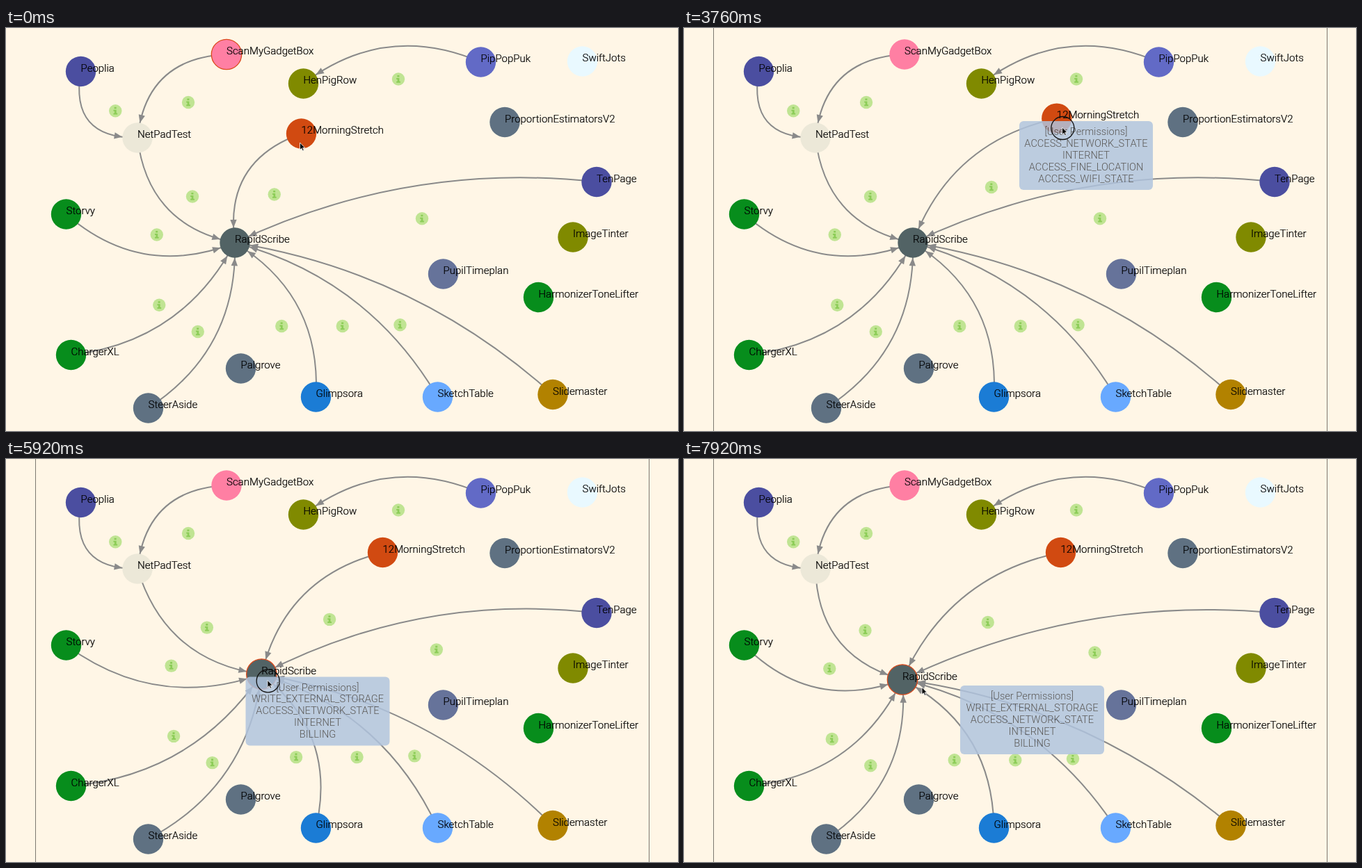
Recreate the animation shown at these times as an HTML page. Size 966 by 580 pixels, loop 8 s.

```html
<!DOCTYPE html>
<html lang="en">
<head>
<meta charset="utf-8">
<style>
  html, body { margin: 0; width: 100%; height: 100%; overflow: hidden; background: #fff6e6; }
  svg { display: block; width: 966px; height: 580px; font: 300 15px Roboto, "Liberation Sans", sans-serif; }
  text { stroke: #000; stroke-width: .2; }
  .edge { fill: none; stroke: #8a8a8a; stroke-width: 2; }
  .tip { font-size: 14.6px; text-anchor: middle; fill: #3c3c3c; stroke: none; }
</style>
</head>
<body>
<svg id="stage" viewBox="0 0 966 580"></svg>
<script>
const LOOP = 8000, RADIUS = 21.7, BEND = 75;
const NODE_LAG = 110, BADGE_LAG = 50;
const GREEN = '#078d1c', SLATE = '#5f7182', INDIGO = '#4b4ea0', OLIVE = '#808a00';

const nodes = {
  people: ['Peoplia', 107.5, 62.5, INDIGO],
  scan: ['ScanMyGadgetBox', 317, 38, '#ff7fa3'],
  web: ['NetPadTest', 189, 158, '#ece8d8'],
  farm: ['HenPigRow', 427.5, 80, OLIVE],
  stretch: ['12MorningStretch', 424.5, 152, '#d14a11'],
  pip: ['PipPopPuk', 682.5, 49, '#626ac6'],
  jots: ['SwiftJots', 828.5, 48, '#e9f9ff'],
  ratio: ['ProportionEstimatorsV2', 717, 135.5, SLATE],
  page: ['TenPage', 849, 221.5, INDIGO],
  story: ['Storvy', 86.5, 268, GREEN],
  hub: ['RapidScribe', 329, 309, '#526365'],
  tint: ['ImageTinter', 815, 301, OLIVE],
  pupil: ['PupilTimeplan', 628.5, 354, '#66739a'],
  tone: ['HarmonizerToneLifter', 765.5, 387.5, GREEN],
  charge: ['ChargerXL', 93.5, 470.5, GREEN],
  grove: ['Palgrove', 337.5, 490, SLATE],
  steer: ['SteerAside', 204.5, 547, SLATE],
  glimpse: ['Glimpsora', 445.5, 531, '#1b7cd5'],
  sketch: ['SketchTable', 620.5, 531, '#68a9ff'],
  slide: ['Slidemaster', 786, 527.5, '#b28200'],
};

const edges = [
  ['people', 'web'], ['scan', 'web'], ['pip', 'farm'],
  ...['web', 'stretch', 'page', 'story', 'charge', 'steer', 'glimpse', 'sketch', 'slide'].map(id => [id, 'hub']),
];

// Pointer stops as [ms, x, y]; dragged nodes and tooltips follow from them.
const stops = [
  [300, 422.5, 165], [1000, 430.5, 163.5], [2560, 430.5, 163.5], [2880, 429, 195],
  [3280, 472, 125], [3600, 541, 141], [4000, 547.5, 146], [4500, 547.5, 146],
  [4900, 334.5, 304.5], [5000, 331.5, 318.5], [5120, 331.5, 324], [6120, 387, 317],
  [6420, 373, 355], [6500, 353, 373], [6560, 339.5, 365.5], [7640, 316.5, 327], [7920, 342, 328.5],
];
const drags = { stretch: [2400, 4240], hub: [5000, 7640] };

const exerciseRights = ['ACCESS_NETWORK_STATE', 'INTERNET', 'ACCESS_FINE_LOCATION', 'ACCESS_WIFI_STATE'];
const editorRights = ['WRITE_EXTERNAL_STORAGE', 'ACCESS_NETWORK_STATE', 'INTERNET', 'BILLING'];
const tips = [
  { from: 1040, to: 3280, width: 192, rights: exerciseRights },
  { from: 3280, to: 4480, width: 192, rights: exerciseRights },
  { from: 4900, to: 6120, width: 207, rights: editorRights },
  { from: 6120, to: LOOP, width: 207, rights: editorRights },
];

const within = (t, from, to) => t >= from && t < to;
const clamp = (v, lo, hi) => Math.min(hi, Math.max(lo, v));
const mix = (a, b, p) => a + (b - a) * p;

function pointerAt(t) {
  const next = stops.findIndex(stop => stop[0] > t);
  if (next <= 0) return stops.at(next).slice(1);
  const [t0, x0, y0] = stops[next - 1], [t1, x1, y1] = stops[next];
  const p = (t - t0) / (t1 - t0);
  return [mix(x0, x1, p), mix(y0, y1, p)];
}

function place(id, t, lag = NODE_LAG) {
  const [, x, y] = nodes[id];
  if (!drags[id]) return [x, y];
  const [from, to] = drags[id];
  const grab = pointerAt(from), now = pointerAt(clamp(t - lag, from, to));
  return [x + now[0] - grab[0], y + now[1] - grab[1]];
}

// Curves join node centres; the discs drawn later cover their ends.
function drawEdge([from, to], t) {
  const a = place(from, t), b = place(to, t);
  const dx = b[0] - a[0], dy = b[1] - a[1], k = BEND / Math.hypot(dx, dy);
  const control = [(a[0] + b[0]) / 2 - dy * k, (a[1] + b[1]) / 2 + dx * k];
  const curve = u => [0, 1].map(i => mix(mix(a[i], control[i], u), mix(control[i], b[i], u), u));
  const before = gap => {
    let u = 1, p = b;
    while (u > 0 && Math.hypot(p[0] - b[0], p[1] - b[1]) < gap) p = curve(u -= 0.001);
    return p;
  };
  const tip = before(RADIUS), tail = before(RADIUS + 11);
  const angle = Math.atan2(tip[1] - tail[1], tip[0] - tail[0]) * 180 / Math.PI;
  return `<path class="edge" d="M${a}Q${control} ${b}"/>
    <path d="M0 0L-11.5 -4.7V4.7Z" fill="#8a8a8a" transform="translate(${tip}) rotate(${angle})"/>`;
}

function drawBadge([from, to], t) {
  const a = place(from, t, BADGE_LAG), b = place(to, t, BADGE_LAG);
  return `<g transform="translate(${(a[0] + b[0]) / 2 + 9} ${(a[1] + b[1]) / 2 + 9})">
    <circle r="9.2" fill="#c0e493"/>
    <path d="M-1.6 -5.5h3v2.6h-3zM-2.8 -1.6h4.2v4.8h1.5v2h-5.7v-2h1.5v-2.8h-1.5z" fill="#8ccc57"/></g>`;
}

function drawNode(id, t) {
  const [label, , , color] = nodes[id], [x, y] = place(id, t);
  const lit = id === 'scan' && t < 2200 || id === 'hub' && t >= 4900;
  return `<circle cx="${x}" cy="${y}" r="${RADIUS}" fill="${color}" ${lit ? 'stroke="#dc4a1c" stroke-width="1.3"' : ''}/>
    <text x="${x}" y="${y}">${label}</text>`;
}

function drawTip({ from, width, rights }) {
  const [x, y] = pointerAt(from);
  const lines = ['[User Permissions]', ...rights].map((line, i) =>
    `<text class="tip" x="${width / 2}" y="${20 + i * 16.9}">${line}</text>`).join('');
  return `<g opacity=".84" transform="translate(${x + 10} ${y + 9})">
    <rect width="${width}" height="99" rx="6" fill="#b0c4de"/>${lines}</g>`;
}

function drawPointer(t) {
  const pressed = Object.values(drags).some(([from, to]) => within(t, from, to));
  return `<g transform="translate(${pointerAt(t)})">
    ${pressed ? '<circle cx=".7" cy="1" r="16.5" fill="none" stroke="#111" stroke-width="1.3"/>' : ''}
    <path d="M0 0V10.4L2.4 8.2L4 11.8L5.7 11L4.1 7.5H7.3Z" fill="#000" stroke="#fff" stroke-width=".8"/></g>`;
}

const stage = document.getElementById('stage');

function render(t) {
  stage.innerHTML = [
    ...edges.map(edge => drawEdge(edge, t)),
    ...edges.map(edge => drawBadge(edge, t)),
    ...Object.keys(nodes).map(id => drawNode(id, t)),
    t >= 2200 ? '<path d="M42.5 0V580M924.5 0V580" stroke="#7d7970"/>' : '',
    ...tips.filter(tip => within(t, tip.from, tip.to)).map(drawTip),
    drawPointer(t),
  ].join('');
}

const origin = performance.now();
function tick() {
  render((performance.now() - origin) % LOOP);
  requestAnimationFrame(tick);
}
tick();
</script>
</body>
</html>
```
